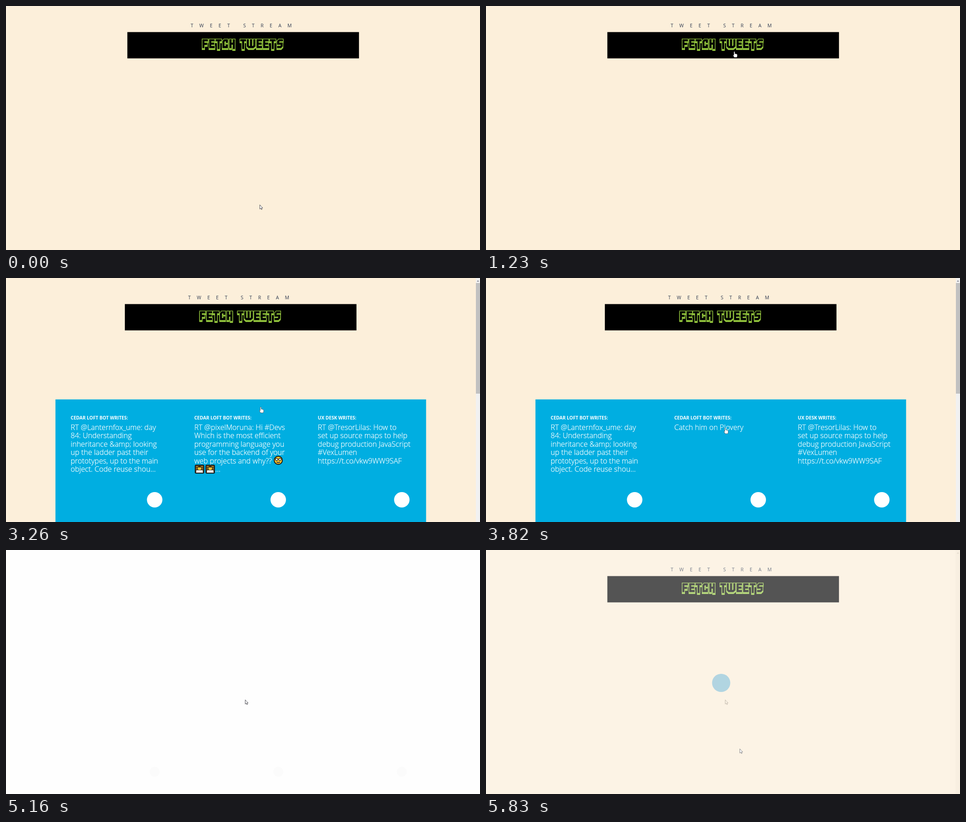
Write an HTML page that moves like this. It is 1041x538 px and loops after 5900 ms.

```html
<!DOCTYPE html>
<html lang="en">
<head>
<meta charset="utf-8">
<title>Tweet stream</title>
<style>
  html, body { margin: 0; width: 100%; height: 100%; overflow: hidden; background: #fefefe; }
  svg { display: block; width: 100vw; height: 100vh; }
  text { font-family: "Open Sans", "Noto Sans", sans-serif; }
  .title { font-size: 10.5px; letter-spacing: 13.3px; fill: #2f3a50; }
  .name { font-size: 10.1px; font-weight: 700; fill: #fff; }
  .tweet { font-size: 16.1px; font-weight: 300; fill: #fff; stroke: #fff; stroke-width: .25; }
  .glyphs { fill: none; stroke-linecap: square; stroke-linejoin: miter; }
  .arrow, .hand { fill: #fff; stroke: #2a2a33; stroke-width: .8; stroke-linejoin: round; }
  .hand { stroke-width: .6; }
</style>
</head>
<body>
<svg viewBox="0 0 1041 538">
  <defs>
    <path id="arrow" class="arrow" d="M.4 .4V9.8L2.5 7.8L4 11L5.4 10.4L4 7.3H6.8Z"/>
    <path id="hand" class="hand" d="M-.6 8.6V1.6a1.1 1.1 0 0 1 2.2 0V5l3.6.8q1.7.4 1.7 2V10q0 1.500-1 3.200H0L-2.400 8.600q.2-1.500 1.800 0z"/>
    <g id="nerd">
      <circle r="9" fill="#fbc530" stroke="#111" stroke-width="1.8"/>
      <g fill="#fff" stroke="#111" stroke-width="1.3">
        <circle cx="-3.700" cy="-2" r="2.600"/><circle cx="3.700" cy="-2" r="2.600"/>
      </g>
      <path d="M-4 4Q0 7.500 4 4Z" fill="#fff" stroke="#111"/>
    </g>
    <g id="coder">
      <rect x="-9.500" y="-9" width="19" height="18" rx="2" fill="#4b3a1c" stroke="#111" stroke-width="1.6"/>
      <path d="M-8-6H8M-8-2H8M-8 2H8" stroke="#d9952b" stroke-width="1.4"/>
      <circle cy="-2" r="4.600" fill="#fbc530" stroke="#111"/>
      <path d="M-4-4Q0-8.500 4-4Z" fill="#111"/>
      <path d="M-7 2H7L8 8H-8Z" fill="#f4f4f4" stroke="#111" stroke-width=".6"/>
    </g>
  </defs>

  <g id="loader">
    <rect width="1041" height="538" fill="#fefefe"/>
    <g id="ghosts" fill="#fbfbfb"></g>
    <g id="waiting">
      <circle cx="516.500" cy="293" r="20" fill="#1da1f2"/>
      <rect x="1031" width="10" height="538" fill="#f1f1f1"/>
      <path d="M1034 8L1036.500 5L1039 8Z" fill="#b5b5b5"/>
    </g>
    <use href="#arrow" x="525" y="330"/>
  </g>

  <g id="page">
    <rect width="1041" height="538" fill="#fcefda"/>
    <rect width="5" height="538" fill="#fdf1de"/>
    <g id="header">
      <text class="title" x="405.500" y="47">TWEET STREAM</text>
      <rect x="266.500" y="57.500" width="508.700" height="58"/>
      <g id="label" class="glyphs" role="img" aria-label="FETCH TWEETS"></g>
    </g>
    <g id="feed">
      <rect x="108.600" y="267.700" width="814" height="271" fill="#00aee1"/>
      <g id="cards"></g>
      <text id="back" class="tweet" x="413.500" y="335">Catch him on Plovery</text>
      <rect x="1032" width="9" height="538" fill="#f1f1f1"/>
      <rect x="1032" y="11" width="9" height="244" fill="#c1c1c1"/>
      <path d="M1034 8L1036.500 5L1039 8Z" fill="#85858f"/>
    </g>
    <circle id="ring" r="8.500" fill="#ff0" fill-opacity=".47"/>
    <use id="cursor"/>
  </g>
</svg>
<script>
const LOOP = 5900;
const $ = id => document.getElementById(id);
const show = (id, on) => $(id).setAttribute('display', on ? 'inline' : 'none');
const mix = (a, b, p) => a + (b - a) * p;

// Block lettering: each letter is a skeleton, stroked green with a drop, then black
const shapes = {
  F: 'M11 3.5H3.5V18.5M3.5 11.5H9.5',
  E: 'M11 3.5H3.5V18.5H11M3.5 11H10',
  T: 'M3.5 3.5H12M7.8 3.5V20.5',
  C: 'M11 7V3.5H6L3.5 6.5V18.5H11V15',
  H: 'M3.5 3.5V18.5M11 3.5V20.5M3.5 11H11',
  W: 'M3.5 3.5V16L6 18.5H15L18 16V3.5M10.7 3.5V18',
  S: 'M12 3.5H6L3.5 6.5V11H11.5V16L9 18.5H3.5'
};
const spots = [430, 445, 459, 474, 489.5, 0, 513, 527.5, 549, 563.5, 578, 594];

function lettering(word) {
  const layer = (color, width, dy) => [...word].map((c, i) => shapes[c]
    ? `<path d="${shapes[c]}" transform="translate(${spots[i]} ${72 + dy})" stroke="${color}" stroke-width="${width}"/>`
    : '').join('');
  const green = '#90c13c';
  return layer(green, 7, 3) + layer(green, 7, 0) + layer('#000', 4.3, 0);
}

const tweets = [
  ['CEDAR LOFT BOT', 'RT @Lanternfox_ume: day', '84: Understanding', 'inheritance &amp;amp; looking',
    'up the ladder past their', 'prototypes, up to the main', 'object. Code reuse shou…'],
  ['CEDAR LOFT BOT', 'RT @pixelMoruna: Hi #Devs', 'Which is the most efficient', 'programming language you',
    'use for the backend of your', 'web projects and why??'],
  ['UX DESK', 'RT @TresorLilas: How to', 'set up source maps to help', 'debug production JavaScript',
    '#VexLumen', 'https://t.co/vkw9WW9SAF']
];
const emojis = `<use href="#nerd" x="598" y="402"/><use href="#coder" x="425" y="421.5"/>
  <use href="#coder" x="448.5" y="421.5"/><text class="tweet" x="459.5" y="427">…</text>`;

function card([name, ...lines], i) {
  const x = 142 + i * 271.4;
  const body = lines.map((s, n) => `<text class="tweet" x="${x}" y="${335 + n * 18.4}">${s}</text>`).join('');
  return `<text class="name" x="${x}" y="311.6">${name} WRITES:</text>
    <g id="tweet${i}">${body}${i === 1 ? emojis : ''}</g>
    <circle cx="${x + 184.5}" cy="489" r="17" fill="#fff"/>`;
}

$('label').innerHTML = lettering('FETCH TWEETS');
$('cards').innerHTML = tweets.map(card).join('');
$('ghosts').innerHTML = tweets.map((_, i) => `<circle cx="${326.5 + i * 271.4}" cy="489" r="11"/>`).join('');

// Progress in n held steps, the first at a, the last at b
const steps = (t, a, b, n) => t < a ? 0 : Math.min(n, Math.floor((t - a) / (b - a) * (n - 1) + 1e-6) + 1) / n;
const smooth = p => p * p * (3 - 2 * p);

const moves = [
  { from: 70, to: 610, n: 8, path: [[557, 438], [570, 330], [528, 160], [545, 100]] },
  { from: 2790, to: 3340, n: 8, path: [[545, 100], [645, 130], [595, 280], [531, 303]] },
  { from: 3410, to: 3820, n: 6, path: [[531, 303], [529, 312], [525, 322], [525, 330]] }
];

function pointer(t) {
  const m = moves.filter(v => t >= v.from).pop() || moves[0];
  const p = smooth(steps(t, m.from, m.to, m.n)), q = 1 - p;
  const axis = k => q * q * q * m.path[0][k] + 3 * q * q * p * m.path[1][k]
    + 3 * q * p * p * m.path[2][k] + p * p * p * m.path[3][k];
  return [Math.round(axis(0)), Math.round(axis(1))];
}

// The hover text rushes in from the right, leaning over and back
function rush(p) {
  const dx = mix(203, 0, Math.min(1, p / .6));
  const lean = p < .6 ? mix(-30, 20, p / .6) : p < .8 ? mix(20, -5, (p - .6) / .2) : mix(-5, 0, (p - .8) / .2);
  $('back').setAttribute('transform', `translate(${515 + dx} 415) skewX(${lean}) translate(-515 -415)`);
  $('back').setAttribute('opacity', Math.min(1, p / .6));
}

function draw(t) {
  const loaded = t >= 2150 && t < 5160;
  const hover = t >= 3410;
  $('page').setAttribute('opacity', t < 5160 ? 1 : t < 5760 ? 0 : t < 5830 ? 1 / 3 : 2 / 3);
  show('waiting', t >= 5540);
  show('ghosts', t < 5540);
  show('feed', loaded);
  $('header').setAttribute('transform', `translate(${loaded ? -5.5 : 0} 0)`);
  show('tweet1', !hover);
  show('back', hover);
  rush(steps(t, 3410, 3820, 6));

  const [x, y] = pointer(t < 5160 ? t : 0);
  const overLink = y < 116 || (y > 268 && loaded);
  const hand = t >= 1230 && t < 4980 && overLink;
  const cursor = $('cursor');
  cursor.setAttribute('href', hand ? '#hand' : '#arrow');
  cursor.setAttribute('x', x);
  cursor.setAttribute('y', y);
  $('ring').setAttribute('cx', x + .5);
  $('ring').setAttribute('cy', y - .5);
  show('ring', (t >= 680 && t < 850) || (t >= 4510 && t < 4740));
}

const start = performance.now();
function tick() {
  draw((performance.now() - start) % LOOP);
  requestAnimationFrame(tick);
}
tick();
</script>
</body>
</html>
```
